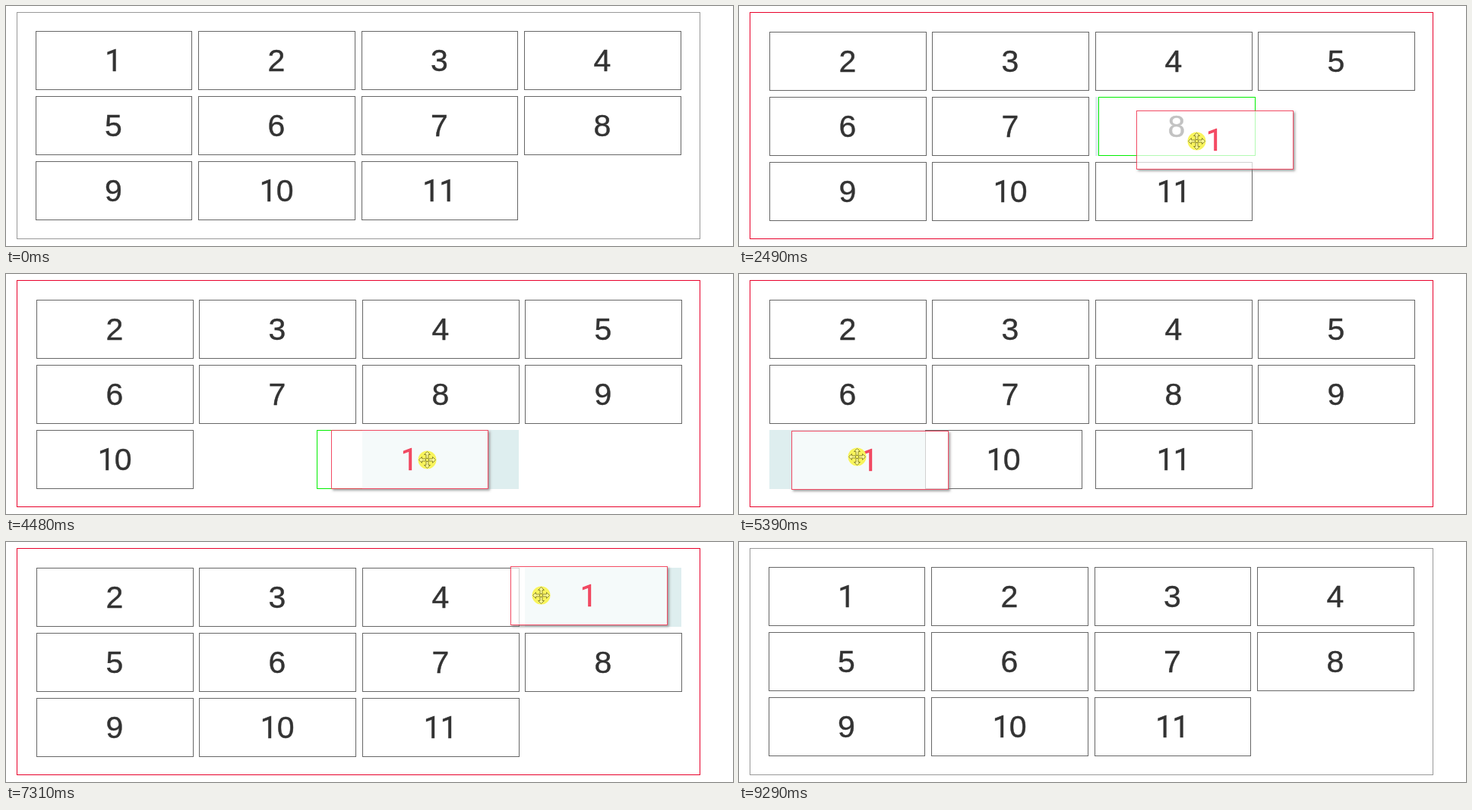
Animation of 957 by 317 pixels, one loop 9.59 s. Source, as an HTML page with a canvas:

```html
<!DOCTYPE html>
<html lang="en">
<head>
<meta charset="utf-8">
<title>Sortable grid</title>
<style>
  html, body { margin: 0; width: 100%; height: 100%; overflow: hidden; background: #fff; }
  canvas { display: block; }
</style>
</head>
<body>
<canvas id="stage" width="957" height="317"></canvas>
<script>
const ctx = document.getElementById('stage').getContext('2d');
const LOOP = 9590, SHOW = 190, GRAB = 900, DROP = 8560, HIDE = 9290;
const SLIDE = 200;   // time a displaced card takes to its new place
const LEAD = 130;    // the dragged card trails the pointer by this time
const W = 207, H = 78, PITCH_X = 214.5, PITCH_Y = 86;
const RED = '#f00024', INK = '#333', LINE = '#666';

// Waypoints of the hand: time, x, y
const path = [
  [320, 885, 335], [870, 143, 73], [1000, 143, 73],
  [1680, 805, 70], [2100, 812, 162],
  [2490, 626, 177], [2620, 602, 178], [3040, 110, 173],
  [3500, 146, 236], [3630, 227, 238], [4800, 568, 246],
  [5220, 201, 247], [5390, 172, 246], [5520, 155, 241], [5760, 112, 172], [6000, 140, 160],
  [6425, 514, 154], [6580, 585, 153], [6710, 671, 154], [6850, 814, 148], [7100, 814, 72],
  [7944, 414, 68], [8020, 388, 67], [8150, 287, 60], [8400, 143, 73],
  [8690, 143, 73], [9130, 767, 234], [9420, 885, 331]
];

const clamp = (v, a, b) => Math.min(b, Math.max(a, v));

// Monotone cubic interpolation through the waypoints.
function along(keys, t) {
  const last = keys.length - 1;
  t = clamp(t, keys[0][0], keys[last][0]);
  let i = 0;
  while (i < last - 1 && keys[i + 1][0] <= t) i++;
  const h = keys[i + 1][0] - keys[i][0], u = (t - keys[i][0]) / h, w = 1 - u;
  const slope = (j, c) => (keys[j + 1][c] - keys[j][c]) / (keys[j + 1][0] - keys[j][0]);
  const tangent = (j, c) => {
    if (j === 0 || j === last) return 0;
    const p = slope(j - 1, c), q = slope(j, c);
    return p * q <= 0 ? 0 : 2 * p * q / (p + q);
  };
  return [1, 2].map(c =>
    keys[i][c] * w * w * (1 + 2 * u) + keys[i + 1][c] * u * u * (3 - 2 * u)
    + h * (tangent(i, c) * u * w * w - tangent(i + 1, c) * u * u * w));
}

const slotXY = (s, off) =>
  [Math.floor(39 + PITCH_X * (s % 4)) + off, 33 + PITCH_Y * Math.floor(s / 4) + off];

// Slot whose box, shrunk by the margins, holds the point; -1 if none.
function slotAt(x, y, mx, my) {
  const col = Math.floor((x - 40) / PITCH_X), row = Math.floor((y - 34) / PITCH_Y);
  const dx = x - 40 - col * PITCH_X, dy = y - 34 - row * PITCH_Y, s = row * 4 + col;
  const inside = dx >= mx && dx <= W - mx && dy >= my && dy <= H - my;
  return inside && col >= 0 && col < 4 && s >= 0 && s < 11 ? s : -1;
}

// Moments at which the dragged card takes another slot.
const moves = [{ time: GRAB, hole: 0, before: 0 }];
for (let t = GRAB; t < DROP; t++) {
  const s = slotAt(...along(path, t), 45, 12), before = moves[moves.length - 1].hole;
  if (s >= 0 && s !== before) moves.push({ time: t, hole: s, before });
}

function frame(x, y, w, h, color) {
  ctx.strokeStyle = color;
  ctx.lineWidth = 1;
  ctx.strokeRect(x + .5, y + .5, w - 1, h - 1);
}

function label(n, cx, base, color) {
  const text = String(n);
  ctx.fillStyle = ctx.strokeStyle = color;
  ctx.lineWidth = .4;
  ctx.textAlign = 'center';
  [...text].forEach((ch, i) => {
    const x = cx + (i - (text.length - 1) / 2) * 22.2;
    // A "1" without a foot
    ctx.font = ch === '1' ? '40px Roboto, sans-serif' : '41px "Liberation Sans", sans-serif';
    ctx.fillText(ch, x, base);
    ctx.strokeText(ch, x, base);
  });
}

function card(n, x, y, w, line, color) {
  x = Math.round(x);
  y = Math.round(y);
  ctx.fillStyle = '#fff';
  ctx.fillRect(x, y, w, H);
  frame(x, y, w, H, line);
  label(n, x + w / 2 - .5, y + 53, color);
}

function drawRest() {
  for (let s = 0; s < 11; s++) card(s + 1, ...slotXY(s, 0), W - (s + 1) % 2, LINE, INK);
}

function drawSorting(t) {
  const { time, hole, before } = moves.filter(m => m.time <= t).pop();
  const u = clamp((t - time) / SLIDE, 0, 1), ease = (1 - Math.cos(Math.PI * u)) / 2;
  let n = 2;
  for (let s = 0; s < 11; s++) {
    const [x, y] = slotXY(s, 1);
    if (s === hole) {
      ctx.fillStyle = '#deeeef';
      ctx.fillRect(x, y, W - 1, H);
      continue;
    }
    // Only the card that was hovered slides; the rest snap.
    const from = n - 2 < before ? n - 2 : n - 1;
    if (from === hole && u < 1) {
      const [fx, fy] = slotXY(from, 1);
      card(n, fx + (x - fx) * ease, fy + (y - fy) * ease, W, u < .6 ? '#0e0' : LINE, INK);
    } else {
      card(n, x, y, W, LINE, INK);
    }
    n++;
  }
}

function drawDragged(cx, cy) {
  const x = Math.round(cx - 103), y = Math.round(cy - 39);
  ctx.save();
  ctx.globalAlpha = .7;
  // Shadow only outside the translucent card
  ctx.save();
  ctx.beginPath();
  ctx.rect(0, 0, 957, 317);
  ctx.rect(x, y, W, H);
  ctx.clip('evenodd');
  ctx.shadowColor = '#777';
  ctx.shadowBlur = 3;
  ctx.shadowOffsetX = ctx.shadowOffsetY = 2;
  ctx.fillStyle = '#fff';
  ctx.fillRect(x, y, W, H);
  ctx.restore();
  card(1, x, y, W, RED, RED);
  ctx.restore();
}

function poly(points, fill, stroke) {
  ctx.beginPath();
  points.forEach(([x, y]) => ctx.lineTo(x, y));
  ctx.closePath();
  ctx.fillStyle = fill;
  ctx.strokeStyle = stroke;
  ctx.lineWidth = .9;
  ctx.fill();
  ctx.stroke();
}

function pointer(x, y, move) {
  ctx.save();
  ctx.translate(Math.round(x) + .5, Math.round(y) + .5);
  ctx.fillStyle = '#f8f45c';
  ctx.beginPath();
  ctx.arc(0, 0, 12, 0, 7);
  ctx.fill();
  if (move) {
    for (let i = 0; i < 4; i++) {
      poly([[0, -11], [4, -7], [1.5, -7], [1.5, -2], [-1.5, -2], [-1.5, -7], [-4, -7]], '#fdfa96', '#857f2a');
      ctx.rotate(Math.PI / 2);
    }
  } else {
    poly([[0, 0], [0, 16], [4, 12], [7, 18], [9, 17], [7, 11], [12, 11]], '#fff', '#222');
  }
  ctx.restore();
}

function draw(t) {
  const sorting = t >= GRAB && t < DROP;
  ctx.fillStyle = '#fff';
  ctx.fillRect(0, 0, 957, 317);
  frame(14, 8, 900, 300, sorting ? '#e8002b' : '#999');
  if (sorting) {
    drawSorting(t);
    drawDragged(...along(path, t));
  } else {
    drawRest();
  }
  if (t >= SHOW && t < HIDE) {
    const [x, y] = along(path, t + LEAD);
    pointer(x, y, sorting || slotAt(x, y, 0, 0) >= 0);
  }
}

const begin = performance.now();
function tick() {
  draw((performance.now() - begin) % LOOP);
  requestAnimationFrame(tick);
}
tick();
</script>
</body>
</html>
```
